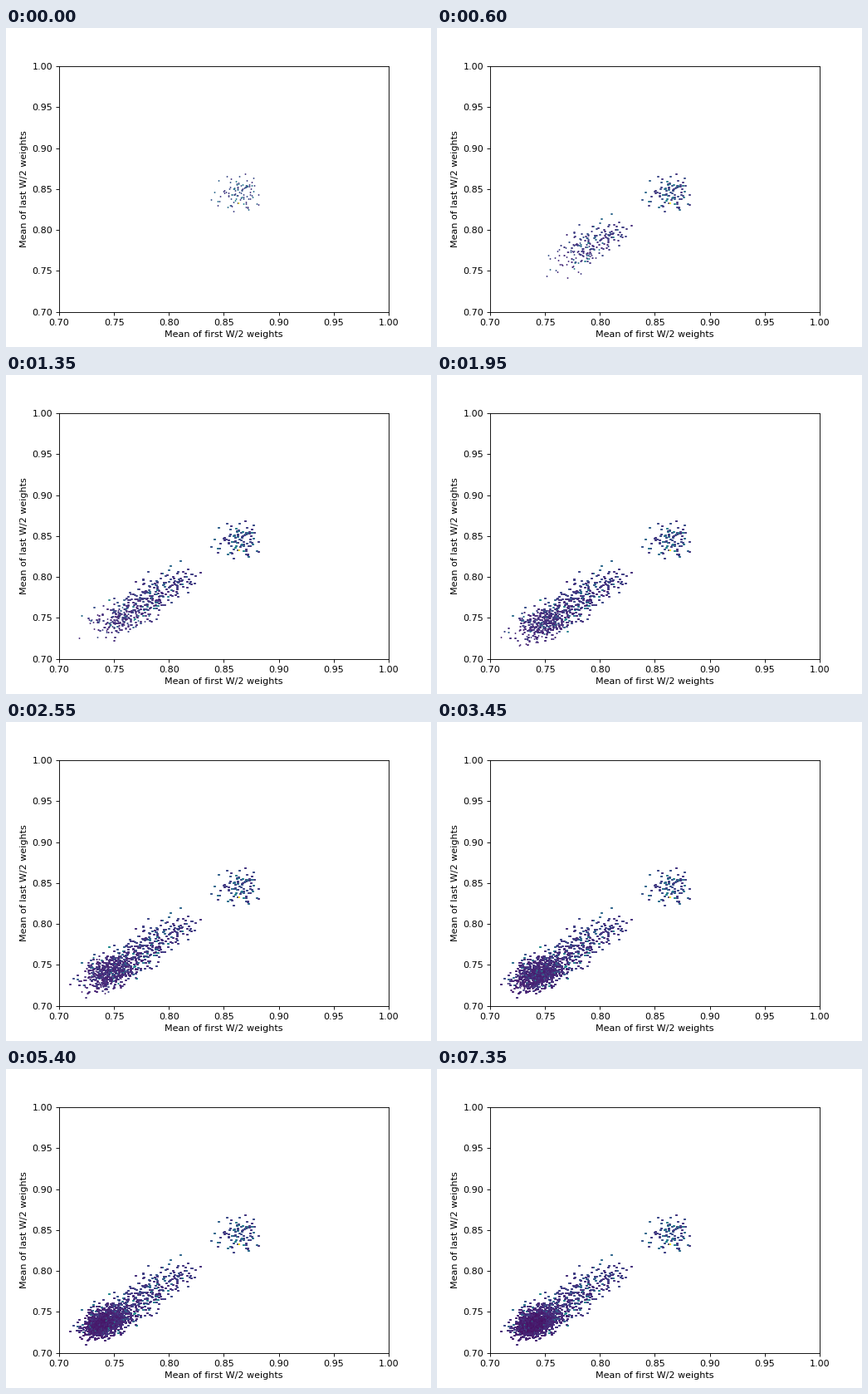
A matplotlib script that plays this animation: 512 by 384 pixels, repeating every 7500 ms.

```python
import numpy as np
import matplotlib.pyplot as plt
from matplotlib.animation import FuncAnimation

FRAMES, STEP_MS = 50, 150
FOUNDERS, CHILDREN = 100, 50
PASSES = 10        # overdraw passes that thicken older dots
BEST = (.864, .833, 1.)

rng = np.random.default_rng(12)


def cloud(n, center, sd, tilt=0.0, reach=3.0):
    """Tilted normal cloud, cut off at `reach` deviations."""
    z = rng.normal(size=(4 * n, 2))
    z = z[np.hypot(*z.T) < reach][:n]
    z[:, 1] = tilt * z[:, 0] + np.sqrt(1 - tilt ** 2) * z[:, 1]
    return np.array(center) + z * sd


def shades(n, base, spread, teal):
    """Mostly dark values with a share of brighter teal ones."""
    dark = np.minimum(base + rng.exponential(spread, n), .35)
    return np.where(rng.random(n) < teal, rng.uniform(.3, .48, n), dark)


def founders():
    pts = cloud(FOUNDERS - 1, (.8635, .8445), (.0112, .0115), reach=2.4)
    return np.vstack([np.column_stack([pts, shades(len(pts), .15, .05, .25)]), BEST])


def generation(g):
    """Offspring drift towards the optimum and then gather around it."""
    fade = np.exp(-(g - 1) / 4.3)
    center = .739 + .069 * fade, .7345 + .0625 * fade
    sd = .0045 + .0075 / (1 + (g / 22) ** 4)
    if g == 1:
        sd *= .75
    pts = cloud(CHILDREN, center, (sd, .92 * sd), tilt=.3)
    age = np.exp(-g / 25)
    c = shades(CHILDREN, .03 + .10 * age, .02 + .045 * age, .11 * age)
    return np.column_stack([pts, c])


fig, ax = plt.subplots(figsize=(6.4, 4.8), dpi=80)
ax.set(xlim=(.7, 1), ylim=(.7, 1),
       xlabel="Mean of first W/2 weights", ylabel="Mean of last W/2 weights")
dots = ax.scatter([], [], c=[], s=2.9, linewidths=0, cmap="viridis", vmin=0, vmax=1)


def snap(pts):
    """Align dots to the pixel grid: column centres, row edges."""
    px = ax.transData.transform(pts)
    px = np.column_stack([np.floor(px[:, 0]) + .5, np.round(px[:, 1])])
    return ax.transData.inverted().transform(px)


history = np.vstack([founders()] + [generation(g) for g in range(1, FRAMES)])
history[:, :2] = snap(history[:, :2])
totals = FOUNDERS + CHILDREN * np.arange(FRAMES)


def draw(i):
    first = max(0, i - PASSES + 1)
    rows = np.vstack([history[:n] for n in totals[first:i + 1]])
    dots.set_offsets(rows[:, :2])
    dots.set_array(rows[:, 2])
    return dots,


anim = FuncAnimation(fig, draw, frames=FRAMES, init_func=lambda: draw(0),
                     interval=STEP_MS, repeat=True, repeat_delay=0)
plt.show()
```
